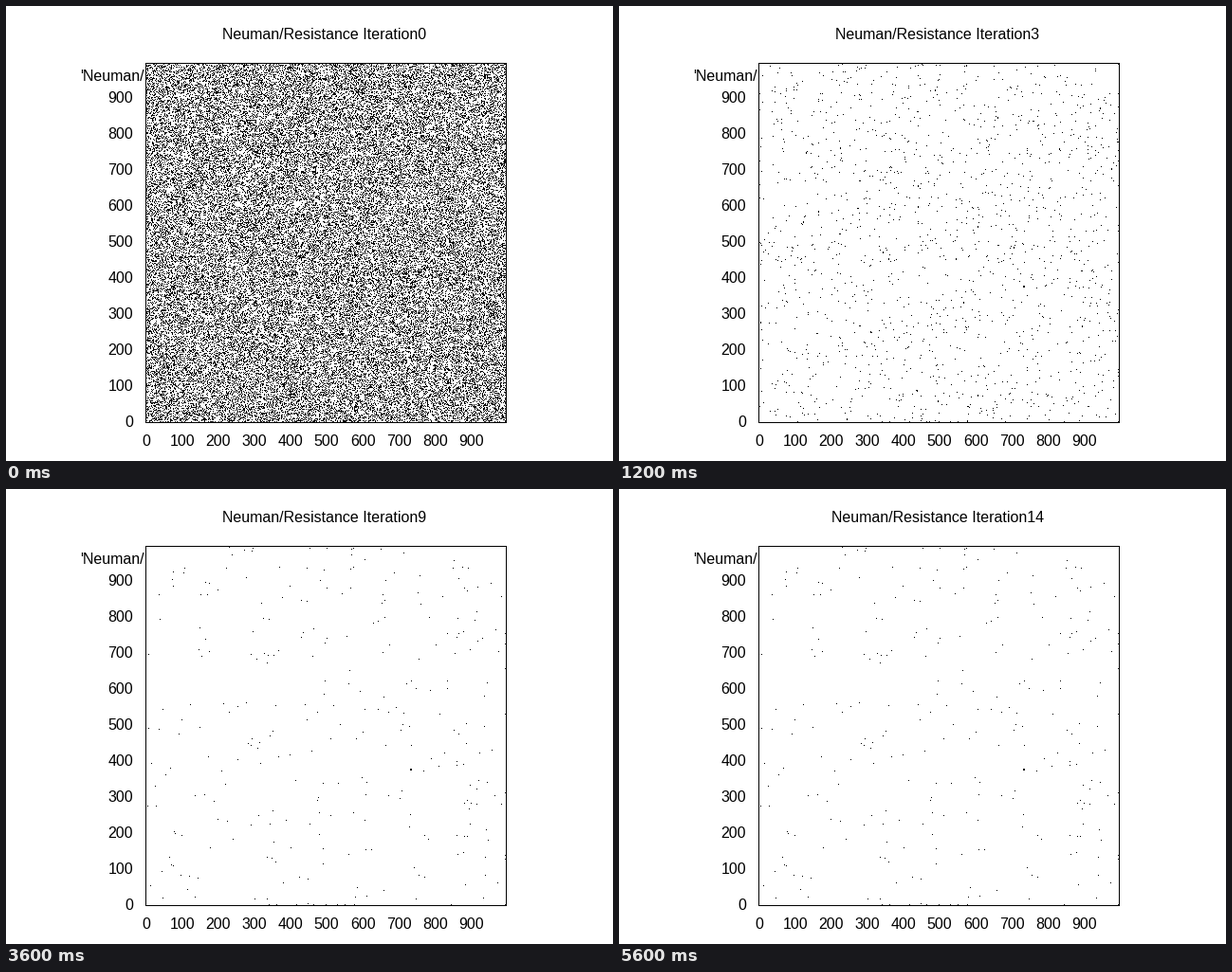
A matplotlib script that plays this animation: 640x480 px, repeating every 6000 ms.

```python
import numpy as np
import matplotlib.pyplot as plt
from matplotlib.animation import FuncAnimation

WIDTH, HEIGHT, DPI = 640, 480, 100
LEFT, TOP, RIGHT, BOTTOM = 147, 60, 527, 439
FRAMES, INTERVAL = 15, 400
DIGIT = 8.9  # advance of one digit in pixels

# Living cells per iteration; the population is stable from the ninth on.
ALIVE = [47500, 18800, 5200, 1500, 560, 350, 300, 284, 278]

plt.rcParams["font.family"] = "Liberation Sans"
plt.rcParams["font.size"] = 16 * 72 / DPI


def survival_order():
    """Rank every cell: the lower the rank, the longer it lives."""
    rng = np.random.default_rng(12)
    order = np.full((HEIGHT, WIDTH), WIDTH * HEIGHT)
    rows, cols = BOTTOM - TOP - 1, RIGHT - LEFT - 1
    order[TOP + 1:BOTTOM, LEFT + 1:RIGHT] = rng.permutation(rows * cols).reshape(rows, cols)
    # Stable clusters and cells kept alive by the walls
    order[295:297, 426:428] = -1
    order[438, [277, 285, 306, 324, 337, 349, 357, 367, 469]] = -1
    order[[152, 163, 189, 237, 386, 390, 438], 526] = -1
    order[[62, 65], [260, 259]] = -1
    order[[61, 92, 143], 526] = 320
    # Frame
    order[[TOP, BOTTOM], LEFT:RIGHT + 1] = -1
    order[TOP:BOTTOM + 1, [LEFT, RIGHT]] = -1
    return order


def picture(iteration):
    alive = ALIVE[min(iteration, len(ALIVE) - 1)]
    return np.where(ORDER < alive, 0, 255).astype(np.uint8)


def label(x, baseline, text):
    return ax.text(x, baseline, text, ha="left", va="baseline", color="black")


ORDER = survival_order()

fig = plt.figure(figsize=(WIDTH / DPI, HEIGHT / DPI), dpi=DPI, facecolor="white")
ax = fig.add_axes([0, 0, 1, 1])
image = ax.imshow(picture(0), cmap="gray", vmin=0, vmax=255, aspect="auto",
                  interpolation="nearest", extent=(0, WIDTH, HEIGHT, 0))
ax.axis("off")

for value in range(0, 1000, 100):
    text = str(value)
    width = DIGIT * len(text)
    label(147.5 + 0.381 * value - width / 2, 464, text)
    label(134 - width, 444 - 0.38 * value, text)
label(78, 79, "'Neuman/")
title = label(228, 35, "")


def update(iteration):
    image.set_data(picture(iteration))
    digits = str(iteration)
    title.set_text("Neuman/Resistance Iteration" + digits)
    title.set_x(228 - DIGIT / 2 * (len(digits) - 1))
    return image, title


anim = FuncAnimation(fig, update, frames=FRAMES, interval=INTERVAL,
                     repeat=True, repeat_delay=0)
plt.show()
```
